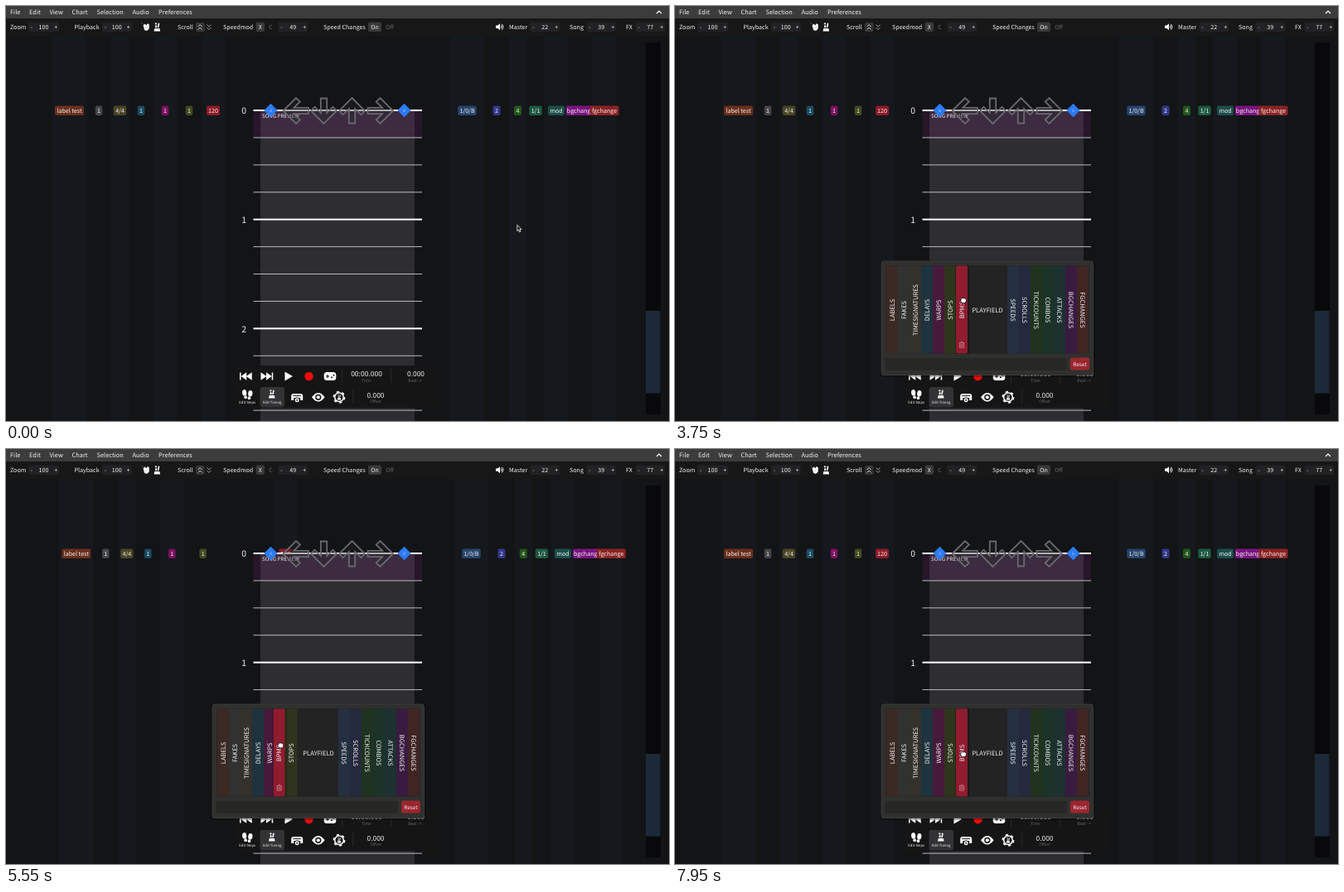
Write an HTML page that moves like this. It is 800 by 501 pixels and loops after 8000 ms.

```html
<!DOCTYPE html>
<html lang="en">
<head>
<meta charset="utf-8">
<title>Timing track editor</title>
<style>
html, body { margin: 0; width: 100%; height: 100%; overflow: hidden; background: #131416; }
svg { display: block; width: 100%; height: 100%; }
text { font-family: "Noto Sans CJK JP", "Noto Sans CJK SC", "Noto Sans CJK", "Noto Sans", sans-serif; text-rendering: geometricPrecision; white-space: pre; }
</style>
</head>
<body>
<svg id="stage" viewBox="0 0 800 501" preserveAspectRatio="none"></svg>
<script>
const LOOP = 8000, STEP = 10, OPEN = 1500, HOVER = 950, GRAB = 3480;

// name, panel colour, tag text, tag colour, tag width, track width
const cols = [
  ['LABELS', '#3b2a23', 'label test', '#6b2f1c', 35, 42],
  ['FAKES', '#313131', '1', '#464648', 8.5, 29],
  ['TIMESIGNATURES', '#34312b', '4/4', '#4a4524', 15.5, 22],
  ['DELAYS', '#1d333d', '1', '#1b4b62', 8.5, 29],
  ['WARPS', '#461a3b', '1', '#7d1160', 8.5, 29],
  ['STOPS', '#2f341c', '1', '#424a20', 8.5, 29],
  ['BPMS', '#8f1c2f', '120', '#8e1a26', 16, 29],
  ['PLAYFIELD', '#232323'],
  ['SPEEDS', '#243040', '1/0/B', '#27446b', 22.5, 42],
  ['SCROLLS', '#25293d', '2', '#31388a', 9, 29],
  ['TICKCOUNTS', '#1f331e', '4', '#24551a', 9, 22],
  ['COMBOS', '#1c3329', '1/1', '#1d5840', 15.5, 21],
  ['ATTACKS', '#1d3131', 'mod', '#1d4f4a', 20, 29],
  ['BGCHANGES', '#3a1b40', 'bgchange', '#7a1480', 34.5, 29],
  ['FGCHANGES', '#402523', 'fgchange', '#8c2222', 35, 29]
];
const BPM = 6, FIELD = 7;
const others = cols.map((c, i) => i).filter(i => i !== BPM);
const slotW = i => i === FIELD ? 48 : 14;

// time, x, y of the pointer's middle
const path = [
  [0, 619, 268.5], [350, 619, 268.5], [1000, 379, 469], [1600, 379, 469], [2000, 364, 382],
  [2350, 364, 382], [2600, 357, 371], [3000, 357, 371], [3200, 356, 366], [3350, 356, 366],
  [3520, 348, 355], [3750, 348, 355], [4050, 398, 355], [4300, 409, 356], [4600, 423, 357],
  [4750, 438, 357], [5050, 478, 358], [5850, 264, 357], [5920, 264, 357], [6050, 275, 357],
  [6270, 277, 357], [6350, 296.5, 357], [6700, 322, 358], [7150, 348, 362], [7550, 348, 368],
  [LOOP, 348, 368]
];
function pointer(t) {
  let i = 0;
  while (i < path.length - 2 && path[i + 1][0] <= t) i++;
  const [a, ax, ay] = path[i], [b, bx, by] = path[i + 1];
  const u = Math.min(1, (t - a) / (b - a)), e = u * u * (3 - 2 * u);
  return { x: ax + (bx - ax) * e, y: ay + (by - ay) * e };
}

// Centres of all columns with the BPM column at place k
function layout(k) {
  const order = [...others.slice(0, k), BPM, ...others.slice(k)];
  const track = [], panel = [];
  let x = 255;
  for (const i of order) { panel[i] = x + slotW(i) / 2; x += slotW(i); }
  const mid = order.indexOf(FIELD);
  x = 264.5;
  for (const i of order.slice(0, mid).reverse()) { x -= cols[i][5]; track[i] = x + cols[i][5] / 2; }
  x = 535.5;
  for (const i of order.slice(mid + 1)) { track[i] = x + cols[i][5] / 2; x += cols[i][5]; }
  track[FIELD] = 400;
  return { track, panel };
}
const layouts = others.map((_, k) => layout(k)).concat(layout(others.length));

// Columns ease toward their places after each swap
const poses = [];
let track = layouts[BPM].track.slice(), panel = layouts[BPM].panel.slice();
const ease = (now, goal, tau) => now.map((v, i) => v + (goal[i] - v) * (1 - Math.exp(-STEP / tau)));
for (let t = 0; t <= LOOP; t += STEP) {
  const bx = t < GRAB ? 346 : Math.max(262, Math.min(492, pointer(t).x - 2));
  let k = 0;
  layouts.forEach((l, j) => {
    if (Math.abs(l.panel[BPM] - bx) < Math.abs(layouts[k].panel[BPM] - bx)) k = j;
  });
  track = ease(track, layouts[k].track, 88);
  panel = ease(panel, layouts[k].panel, 15);
  panel[BPM] = bx;
  poses.push({ k, track, panel });
}

// Drawing helpers
const box = (x, y, w, h, fill, r = 0, more = '') =>
  `<rect x="${x}" y="${y}" width="${w}" height="${h}" fill="${fill}" rx="${r}" ${more}/>`;
const text = (x, y, size, s, fill = '#f2f2f2', anchor = 'start') =>
  `<text x="${x}" y="${y + size * .365}" font-size="${size}" fill="${fill}" text-anchor="${anchor}">${s}</text>`;
const mid = (x, y, size, s, fill) => text(x, y, size, s, fill, 'middle');
const shape = (d, fill = '#fff', more = '') => `<path d="${d}" fill="${fill}" ${more}/>`;
const line = (d, color, w = 1) => shape(d, 'none', `stroke="${color}" stroke-width="${w}"`);
const at = (x, y, inner, more = '') => `<g transform="translate(${x} ${y})" ${more}>${inner}</g>`;
const dot = (x, y, rx, ry = rx, fill = '#fff', more = '') =>
  `<ellipse cx="${x}" cy="${y}" rx="${rx}" ry="${ry}" fill="${fill}" ${more}/>`;

const metronome = shape('M-3.8 5 L-3 1.5 H3 L3.8 5 Z M-2.4 .6 L-1.7 -2.5 H-.6 L-.2 .6 Z M.4 .6 L1.4 -5 L3 -4.6 L2 .6 Z M-2.5 -5 H-.4 V-3.2 H-2.5 Z');

function spinner(x, w, value) {
  return box(x, 19.5, w, 11.5, '#222224', 2) + mid(x + 4, 25.2, 7, '-') +
    mid(x + w / 2, 25.5, 7.1, value) + mid(x + w - 3.8, 25.2, 7, '+');
}

function bars() {
  let s = box(0, 0, 800, 36, '#171718') + box(0, 0, 800, 15, '#3c3c3d');
  [[5, 'File'], [28, 'Edit'], [52.5, 'View'], [79.5, 'Chart'], [109.5, 'Selection'], [152.5, 'Audio'], [184, 'Preferences']]
    .forEach(([x, n]) => s += text(x, 7.7, 7.45, n));
  s += line('M785 9 L788 6 L791 9', '#fff', 1.2);
  [[5, 'Zoom'], [82.5, 'Playback'], [207, 'Scroll'], [262, 'Speedmod'], [383, 'Speed Changes'], [607, 'Master'], [680, 'Song'], [748, 'FX']]
    .forEach(([x, n]) => s += text(x, 25.5, 7.12, n));
  s += spinner(27, 37, '100') + spinner(116, 35.5, '100') + spinner(328.5, 35.5, '49') +
    spinner(632.5, 35.5, '22') + spinner(700.5, 35.5, '39') + spinner(759.5, 35.5, '77');
  s += box(301.5, 19.5, 10.5, 11.5, '#39393a', 2) + mid(306.7, 25.5, 7, 'X') + mid(319.5, 25.5, 7, 'C', '#66666a');
  s += box(437, 19.5, 16, 11.5, '#39393a', 2) + mid(445, 25.5, 7, 'On') + mid(463, 25.5, 7, 'Off', '#66666a');
  s += box(229, 20, 10.5, 11, '#39393a', 2) + dot(234.2, 25.5, 4, 4, '#29292a');
  s += line('M231.7 25 L234.2 22.5 L236.7 25 M231.7 28.5 L234.2 26 L236.7 28.5', '#ddd', 1);
  s += line('M242.5 22.5 L245 25 L247.5 22.5 M242.5 26 L245 28.5 L247.5 26', '#999', 1);
  s += at(169, 25.5, shape('M-3.5 -2.5 L-1 -4 L0 -2 L2 -4.5 L3.8 -3 L3.6 2 L1 4.5 L-2 3.5 Z') + line('M-4 -4 L-5 -5 M-1.5 2 L2 -1', '#bbb', .8));
  s += at(182.3, 25.5, metronome, '') ;
  s += at(596, 25.2, shape('M-5 -1.6 H-2.7 L0 -4 V4 L-2.7 1.6 H-5 Z') + line('M1.3 -1.7 Q2.8 0 1.3 1.7 M2.5 -3.3 Q5.5 0 2.5 3.3', '#fff', 1));
  return s;
}

function tracks() {
  const order = [BPM, ...others.filter(i => i !== FIELD)];
  const band = i => i < FIELD ? i % 2 === 0 : i % 2 === 0;
  let s = '';
  for (const i of order) if (band(i)) {
    const w = cols[i][5];
    s += `<g data-track="${i}">${box(-w / 2, 36, w, 465, '#15181c')}</g>`;
  }
  for (const i of order) {
    const [, , label, color, w] = cols[i];
    s += `<g data-track="${i}">${box(-w / 2, 120.4, w, 11.6, color, 2)}${mid(0, 126.4, 7.1, label)}</g>`;
  }
  return s;
}

function field() {
  let s = box(307, 126, 186, 375, '#2e2d32') + box(298.5, 126, 203.5, 33, '#802080', 0, 'opacity=".19"');
  for (let i = 0; i < 12; i++) {
    const y = 126 + i * 32.92, main = i % 4 === 0;
    s += box(298.5, y - (main ? 1 : .5), 203.5, main ? 2 : 1, main ? '#fff' : '#b9b9bb');
    if (main) s += text(290, y + .5, 10.4, i / 4, '#f2f2f2', 'end');
  }
  s += text(309, 132.7, 6.25, 'SONG PREVIEW', '#f0f0f0');
  const arrow = 'M-15.5 0 L0 -15.5 L4.8 -11 L-2.6 -3.7 H15 V3.7 H-2.6 L4.8 11 L0 15.5 Z';
  [[350, 0], [383.5, -90], [417.5, 90], [451.5, 180]].forEach(([x, a]) =>
    s += `<g transform="translate(${x} 126.5) rotate(${a})">${shape(arrow, '#222226', 'fill-opacity=".35" stroke="#69696c" stroke-width="1.8"')}</g>`);
  [319.5, 480.5].forEach(x => s += at(x, 126, shape('M0 -8.2 L8.2 0 L0 8.2 L-8.2 0 Z', '#2d7bf3') + mid(0, 0, 4.6, '8', '#b5d3ff')));
  return s + box(772, 44, 18, 449, '#09090b') + box(772, 368, 17.5, 99.5, '#1c2938');
}

function controls() {
  let s = box(277, 434, 246, 51.5, '#151516', 3);
  s += at(289.5, 447, shape('M-7.5 -4.5 H-6 V4.5 H-7.5 Z M-6 0 L.7 -4.8 V4.8 Z M.3 0 L7.2 -4.8 V4.8 Z'));
  s += at(314.7, 447, shape('M7.5 -4.5 H6 V4.5 H7.5 Z M6 0 L-.7 -4.8 V4.8 Z M-.3 0 L-7.2 -4.8 V4.8 Z'));
  s += shape('M336.5 441.5 L346 447 L336.5 452.5 Z') + dot(365.5, 447, 5.2, 5.2, '#f00b0b');
  s += box(383.7, 442, 14.6, 10, '#fff', 3.5) + line('M386 447 H390 M388 445 V449', '#151516', 1.1) +
    dot(393, 448.3, 1, 1, '#151516') + dot(395.5, 445.7, 1, 1, '#151516');
  s += box(405, 438, .8, 17, '#303032') + box(464.5, 438, .8, 17, '#303032') + box(418.5, 463, .8, 17, '#303032');
  s += mid(435, 444.3, 8.5, '00:00.000') + mid(435, 452, 5, 'Time', '#69696b');
  s += mid(494.5, 443.6, 8.4, '0.000') + mid(493.5, 451.7, 5, 'Beat →', '#69696b');
  s += mid(446, 470, 8.4, '0.000') + mid(446, 477.6, 4.9, 'Offset', '#69696b');
  s += box(306.5, 460, 29.5, 24.5, '#333335', 3);
  s += at(291.3, 468.3, dot(-3.4, -2, 2.6, 3.7, '#fff', 'transform="rotate(-8)"') + dot(-2.2, 4, 1.8, 2) +
    dot(3.4, -1, 2.6, 3.7, '#fff', 'transform="rotate(8)"') + dot(2.2, 5, 1.8, 2));
  s += at(320.8, 468.5, metronome) + mid(291.2, 478.8, 4.25, 'Edit Steps') + mid(321.2, 478.8, 4.25, 'Edit Timing');
  s += at(351.2, 473, shape('M-7 3 V-2 Q-7 -5 -4 -5 H4 Q7 -5 7 -2 V3 H4 V0 H-4 V3 Z') +
    line('M-5 -2.4 H5', '#151516', 1) + dot(0, 2.8, 3, 3, '#fff', 'stroke="#151516" stroke-width="1"') + dot(0, 2.8, 1, 1, '#151516'));
  s += at(376.8, 472.3, shape('M-7.8 0 Q0 -10.5 7.8 0 Q0 10.5 -7.8 0 Z') + dot(0, 0, 3.6, 3.6, '#151516') + dot(0, 0, 2.1), 'id="eye"');
  s += at(402, 472.3, dot(0, 0, 5.3, 5.3, 'none', 'stroke="#fff" stroke-width="1.5"') +
    dot(0, 0, 6.6, 6.6, 'none', 'stroke="#fff" stroke-width="1.7" stroke-dasharray="3.2 3.71"') +
    `<g transform="scale(.62)">${metronome}</g>`);
  s += `<g id="tip">${box(329.5, 438.5, 94.5, 17, '#121213', 3)}${shape('M373 455.5 H381 L377 459 Z', '#121213')}${mid(377, 447.3, 6.52, 'Toggle timing track visibility')}</g>`;
  return s;
}

function popup() {
  let s = box(247.5, 307, 259, 141, '#000', 4, 'opacity=".3"') +
    box(249, 308, 255.5, 137.5, '#30312f', 3, 'stroke="#41423f" stroke-width=".8"');
  s += box(254, 313, 246, 107, '#252625', 2) + box(253.5, 425, 219.5, 15, '#272726', 2);
  s += box(477, 424.5, 23, 15, '#9c262e', 2.5) + mid(488.4, 432.2, 6.4, 'Reset');
  for (const i of [...others, BPM]) {
    const w = slotW(i), turn = i === FIELD ? 0 : i < FIELD ? -90 : 90;
    s += `<g data-slot="${i}">`;
    if (i === BPM) s += box(-8, 313, 17, 107, '#000', 1, 'opacity=".25" id="shade"');
    s += box(-w / 2, 313.5, w, 106, cols[i][1], i === BPM ? 1.5 : 0, `id="fill${i}"`);
    s += `<g id="name${i}" transform="translate(0 367) rotate(${turn})">${mid(0, 0, 7.5, cols[i][0])}</g>`;
    if (i === BPM) s += at(0, 409, line('M-3 -2.3 H3 M-1 -3.4 H1 M-2.4 -2.3 V3.3 H2.4 V-2.3 M-.8 -.8 V2 M.8 -.8 V2', '#d08a92', .8), 'id="bin"');
    s += '</g>';
  }
  return s;
}

const rim = 'stroke="#000" stroke-width=".8" stroke-linejoin="round"';
const cursors = [
  shape('M-2.2 -4.2 V3 L-.6 1.6 L.6 4.4 L1.9 3.8 L.8 1.2 H3 Z', '#111', 'stroke="#fff" stroke-width=".8"'),
  shape('M-2 -4.6 Q-1 -5.2 -.6 -4.2 L0 -1.5 Q2 -2 3.4 -.8 L3.6 2 L2.4 4.4 H-1.2 L-3.8 .8 Q-3.4 -.3 -2 .4 Z', '#fff', rim),
  shape('M-3.2 -2.6 Q-2 -4 -1.2 -2.4 Q-.6 -4.8 .5 -2.8 Q1.6 -4.4 2.2 -2.2 Q3.8 -3 3.4 0 L2.6 4 H-1.4 L-3.8 1 Q-3.6 0 -2.4 .4 Z', '#fff', rim),
  shape('M-2.8 -1.4 Q-2 -3 -1 -2 Q0 -3.2 1 -2 Q2.2 -3 2.8 -1.2 Q3.8 -1 3.4 1 L2.5 3.6 H-1.5 L-3.4 1.2 Z', '#fff', rim)
].map((c, i) => `<g id="cur${i}">${c}</g>`).join('');

const stage = document.getElementById('stage');
stage.innerHTML = box(0, 0, 800, 501, '#131416') + tracks() + field() + bars() + controls() +
  `<g id="popup">${popup()}</g><g id="pointer">${cursors}</g>`;

const id = n => document.getElementById(n);
const show = (n, on) => id(n).setAttribute('visibility', on ? 'inherit' : 'hidden');
const trackEls = [...stage.querySelectorAll('[data-track]')];
const slotEls = [...stage.querySelectorAll('[data-slot]')];
const place = (el, x) => el.setAttribute('transform', `translate(${x.toFixed(2)} 0)`);

function draw(t) {
  const p = poses[Math.floor(t / STEP)], c = pointer(t);
  const open = t >= OPEN, hover = t >= HOVER && !open;
  const grab = t >= GRAB, lit = grab || (t > 3350 && c.x < 353);
  trackEls.forEach(el => place(el, p.track[el.dataset.track]));
  slotEls.forEach(el => place(el, p.panel[el.dataset.slot]));
  id('popup').setAttribute('visibility', open ? 'visible' : 'hidden');
  show('tip', hover);
  id('eye').setAttribute('opacity', hover ? .5 : 1);
  id('fill' + BPM).setAttribute('fill', lit ? '#8f1c2f' : '#421b20');
  show('bin', lit);
  show('shade', grab);
  id('name' + BPM).setAttribute('transform', `translate(0 367) rotate(${p.k > BPM ? 90 : -90})`);
  const over = open && !lit && c.x > 353 && c.x < 401 && c.y > 313 && c.y < 420;
  id('fill' + FIELD).setAttribute('fill', over ? '#2f302f' : '#232323');
  const kind = grab ? 3 : over || lit ? 2 : t >= HOVER && c.y > 455 ? 1 : 0;
  for (let i = 0; i < 4; i++) show('cur' + i, i === kind);
  id('pointer').setAttribute('transform', `translate(${c.x.toFixed(2)} ${c.y.toFixed(2)})`);
}

const start = performance.now();
function tick() {
  draw((performance.now() - start) % LOOP);
  requestAnimationFrame(tick);
}
tick();
</script>
</body>
</html>
```
